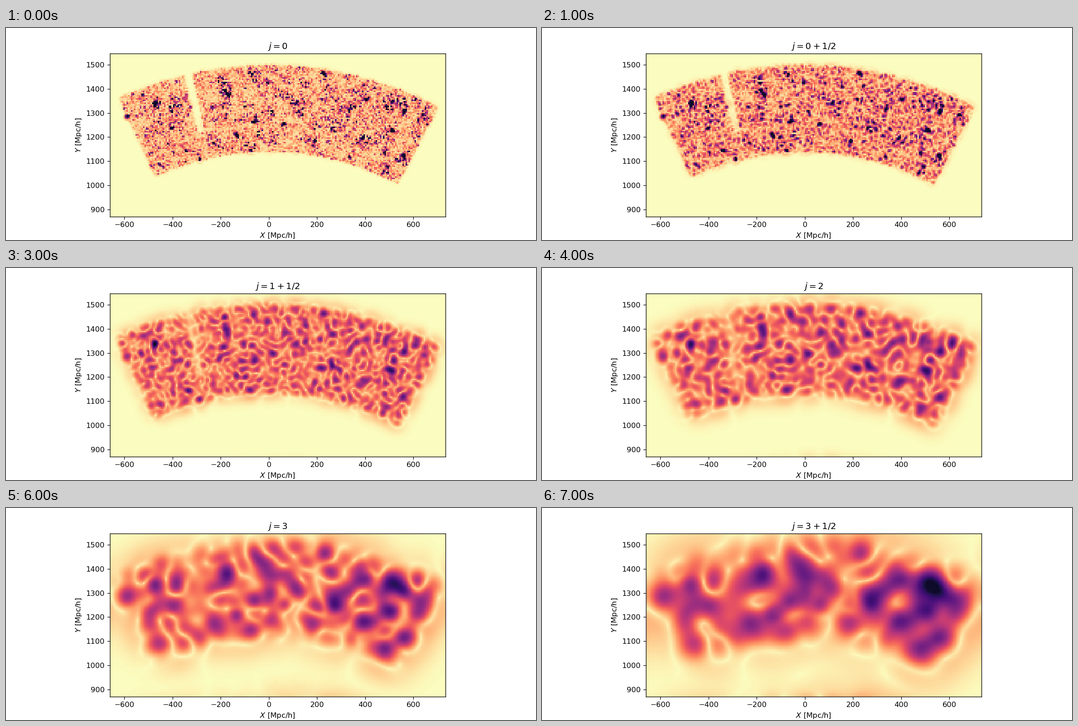
Recreate the animation shown at these times as a matplotlib script. Size 1183x473 px, loop 8 s.

```python
import numpy as np
import matplotlib.pyplot as plt
from matplotlib.animation import FuncAnimation

DPI = 118.3
COLS, ROWS = 224, 109
X_MIN, X_MAX, Y_MIN, Y_MAX = EXTENT = (-660.5, 733.5, 869.5, 1547)
SCALES = np.arange(0, 4, 0.5)

# Main over-densities in Mpc/h, strongest first
CLUMPS = [(-134, 1206), (62, 1250), (-171, 1377), (515, 1226), (512, 1345),
          (-60, 1262), (562, 1308), (232, 1466), (405, 1358), (-478, 1340),
          (387, 1190), (555, 1120), (620, 1268), (-586, 1284), (480, 1078),
          (-236, 1170), (-400, 1238), (8, 1425), (340, 1110), (-361, 1158),
          (331, 1300), (108, 1338), (190, 1168), (-450, 1080)]

x = X_MIN + (np.arange(COLS) + 0.5) * (X_MAX - X_MIN) / COLS
y = Y_MAX - (np.arange(ROWS) + 0.5) * (Y_MAX - Y_MIN) / ROWS
X, Y = np.meshgrid(x, y)
FREQ2 = np.fft.fftfreq(ROWS)[:, None] ** 2 + np.fft.fftfreq(COLS)[None] ** 2


def smooth(field, sigma):
    """Periodic Gaussian blur; sigma is in cells."""
    kernel = np.exp(-2 * (np.pi * sigma) ** 2 * FREQ2)
    return np.fft.ifft2(np.fft.fft2(field) * kernel).real


def survey_mask():
    radius, angle = np.hypot(X, Y), np.degrees(np.arctan2(X, Y))
    wedge = (radius > 1138) & (radius < 1497) & (angle > -24.6) & (angle < 28)
    gap = (angle > -13.6) & (angle < -12.3) & (Y > 1215)
    return wedge & ~gap


def clump_impulses():
    field = np.zeros((ROWS, COLS))
    for (cx, cy), strength in zip(CLUMPS, np.linspace(3, 1.5, len(CLUMPS))):
        field[np.abs(y - cy).argmin(), np.abs(x - cx).argmin()] = strength
    return field


MASK = survey_mask()
IMPULSES = clump_impulses()
NOISE = np.random.default_rng(12).standard_normal((2, ROWS, COLS)) * MASK


def band_pass(noise, sigma):
    out = smooth(noise, sigma) - smooth(noise, 2 * sigma)
    return out / out[MASK].std()


def modulus(j):
    """Size of the complex band-passed density at scale j."""
    sigma = 0.75 * 2 ** (0.9 * j)
    width = np.hypot(sigma, 1.2)
    peaks = smooth(IMPULSES, width) * 2 * np.pi * width ** 2
    calm = 1 - 0.2 * np.clip(peaks, 0, 3)
    real, imag = (band_pass(noise, sigma) * calm for noise in NOISE)
    return np.hypot(real + peaks, 0.5 * imag)


CROWDING = modulus(2.5) - 0.9


def density_map(j):
    crowd = np.clip(1 + 0.45 * 0.4 ** j * CROWDING, 0.6, 1.7)
    gain = 0.29 - 0.14 * 0.3 ** j
    power = max(0.75, 1.6 - 0.6 * j)
    ground = 0.05 * smooth(MASK, 0.8 * 2 ** j)
    return np.clip(ground + gain * (modulus(j) * crowd) ** power, 0, 0.92)


def scale_label(j):
    half = " + 1/2" if j % 1 else ""
    return f"$j = {int(j)}{half}$"


maps = [density_map(j) for j in SCALES]

fig, ax = plt.subplots(figsize=(1183 / DPI, 473 / DPI), dpi=DPI)
image = ax.imshow(maps[0], cmap="magma_r", vmin=0, vmax=1, extent=EXTENT)
ax.set_xlabel("$X$ [Mpc/h]")
ax.set_ylabel("$Y$ [Mpc/h]")
title = ax.set_title("")


def update(frame):
    image.set_data(maps[frame])
    title.set_text(scale_label(SCALES[frame]))
    return image, title


anim = FuncAnimation(fig, update, frames=len(SCALES), interval=1000, repeat=True)
plt.show()
```
